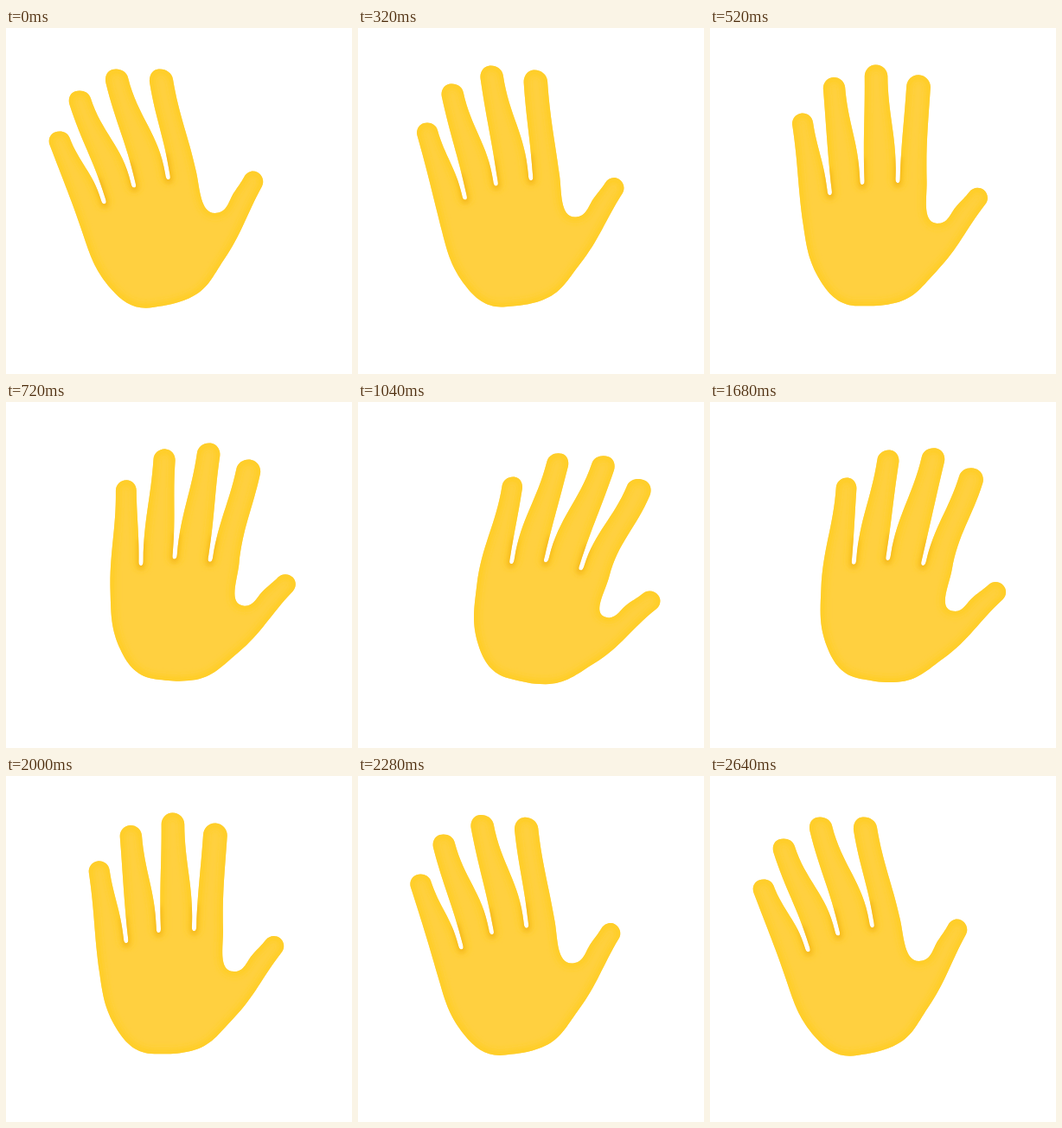
Write an HTML page that moves like this. It is 400x400 px and loops after 2.68 s.

```html
<!DOCTYPE html>
<html lang="en">
<head>
<meta charset="utf-8">
<title>Waving hand</title>
<style>
  html, body { margin: 0; width: 100%; height: 100%; overflow: hidden; background: #fff; }
  svg { display: block; width: 100%; height: 100%; }
</style>
</head>
<body>
<svg viewBox="0 0 400 400">
  <defs>
    <path id="hand"/>
    <clipPath id="inside"><use href="#hand"/></clipPath>
    <filter id="soft" filterUnits="userSpaceOnUse" x="0" y="0" width="400" height="400">
      <feGaussianBlur stdDeviation="3"/>
    </filter>
  </defs>
  <use href="#hand" fill="#ffd040"/>
  <g clip-path="url(#inside)" fill="none" stroke-linecap="round" filter="url(#soft)">
    <use href="#hand" stroke="#ffcd24" stroke-width="12" opacity=".8"/>
    <path id="creases" stroke="#e5940f" stroke-width="6" opacity=".6"/>
  </g>
</svg>
<script>
const LOOP = 2680, STEP = 40;
const OUT = 1220, BACK = 1310, BACK_TIME = 1210;
const WRIST = { x: 181, y: 333 };
const UPRIGHT = 0.47;

const el = id => document.getElementById(id);
const rad = deg => deg * Math.PI / 180;
const ease = k => (1 - Math.cos(Math.PI * Math.min(1, Math.max(0, k)))) / 2;

// Headings and angles are in degrees, clockwise from straight up.
const move = (p, heading, d) =>
  ({ x: p.x + d * Math.sin(rad(heading)), y: p.y - d * Math.cos(rad(heading)) });
const fromWrist = (angle, r) => move(WRIST, angle, r);
// Give is how fully a point follows the bend of the hand.
const node = (p, heading, give = 1) => ({ ...p, heading, give });

function tip(c, h, r, give) {
  return [
    node(move(c, h - 90, r), h, give),
    node(move(c, h, r), h + 90, give),
    node(move(c, h + 90, r), h + 180, give)
  ];
}

function gap(p, h) {
  const up = move(p, h, 7);
  return [
    node(move(up, h - 90, 2.6), h + 180),
    node(p, h + 90),
    node(move(up, h + 90, 2.6), h)
  ];
}

// The upright hand, clockwise from the left of the wrist
const outline = [
  node({ x: 172, y: 321 }, 272),
  node({ x: 129, y: 290 }, 331),
  node({ x: 112, y: 225 }, -6)
];
const roots = [];
const fingerLength = [234.5, 266, 277.5, 271.5];
fingerLength.forEach((len, i) => {
  const lean = -6 + 4.2 * i;
  outline.push(...tip(fromWrist(-15.7 + 10.45 * i, len), lean, 12 + 0.65 * i));
  if (i < 3) {
    const root = node(fromWrist(-14.5 + 15 * i, 146 + 6 * i), lean + 2.1);
    roots.push(root);
    outline.push(...gap(root, root.heading));
  }
});
outline.push(
  node({ x: 257, y: 180 }, 181),
  node({ x: 268, y: 229 }, 90, 0.93),
  node({ x: 290, y: 209 }, 44, 0.86),
  ...tip({ x: 314, y: 201 }, 40, 11.7, 0.83),
  node({ x: 264, y: 284 }, 226),
  node({ x: 215, y: 319 }, 258)
);

// Turn a point about the wrist; far points turn further.
function bend(n, s) {
  const dx = n.x - WRIST.x, dy = WRIST.y - n.y;
  const r = Math.hypot(dx, dy);
  const turn = (24.3 + 9.5 * (r / 270) ** 2) * (s - UPRIGHT) * n.give;
  const angle = Math.atan2(dx, dy) * 180 / Math.PI + turn;
  return node(fromWrist(angle, r), n.heading + turn);
}

const num = p => p.x.toFixed(2) + ' ' + p.y.toFixed(2);

function smooth(nodes) {
  let d = 'M' + num(nodes[0]);
  nodes.forEach((a, i) => {
    const b = nodes[(i + 1) % nodes.length];
    const h = 0.39 * Math.hypot(b.x - a.x, b.y - a.y);
    d += 'C' + num(move(a, a.heading, h)) + ' ' + num(move(b, b.heading, -h)) + ' ' + num(b);
  });
  return d + 'Z';
}

function draw(t) {
  const s = t < BACK ? ease(t / OUT) : 1 - ease((t - BACK) / BACK_TIME);
  el('hand').setAttribute('d', smooth(outline.map(n => bend(n, s))));
  el('creases').setAttribute('d', roots.map(n => {
    const p = bend(n, s);
    return 'M' + num(move(p, p.heading, 28)) + 'L' + num(move(p, p.heading, -1));
  }).join(''));
}

let start;
function tick(now) {
  if (start === undefined) start = now;
  const t = (now - start) % LOOP;
  draw(Math.floor(t / STEP) * STEP);
  requestAnimationFrame(tick);
}
draw(0);
requestAnimationFrame(tick);
</script>
</body>
</html>
```
